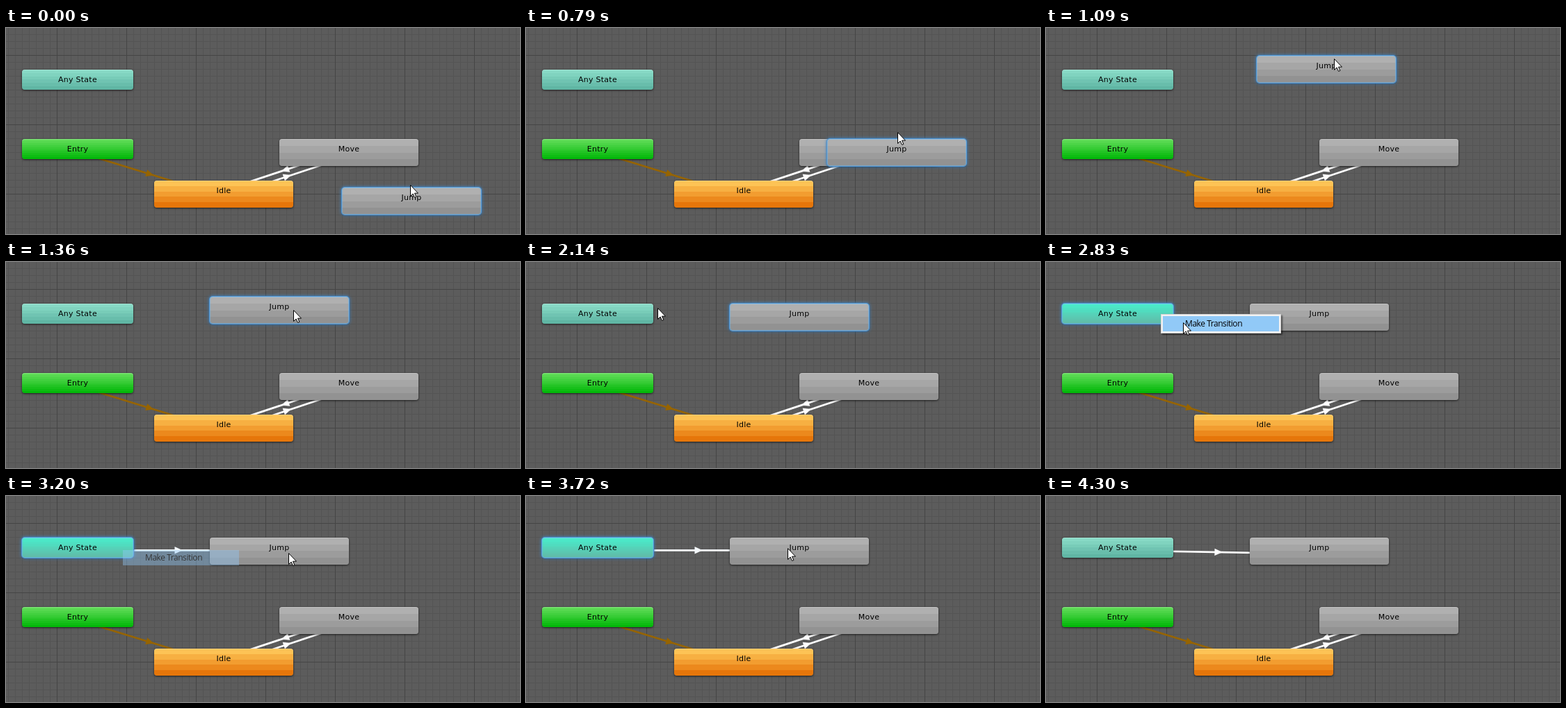
These frames come from a looping animation (739x297 px, 5.71 s). An HTML page:

```html
<!DOCTYPE html>
<html lang="en">
<head>
<meta charset="utf-8">
<title>State graph</title>
<style>
html, body { margin: 0; width: 100%; height: 100%; overflow: hidden; }
body {
  position: relative;
  background:
    repeating-linear-gradient(90deg, #454545 0 1px, transparent 1px 100px) 73px 0 / 100px 100px,
    repeating-linear-gradient(#454545 0 1px, transparent 1px 100px) 0 39px / 100px 100px,
    repeating-linear-gradient(90deg, #545454 0 1px, transparent 1px 10px) 3px 0 / 10px 10px,
    repeating-linear-gradient(#545454 0 1px, transparent 1px 10px) 0 9px / 10px 10px,
    #5c5c5c;
}
svg, div { position: absolute; left: 0; top: 0; }
.node, .node i { border-radius: 4px; }
.node {
  font: 11px/30px "DejaVu Sans", sans-serif;
  letter-spacing: .25px;
  text-align: center;
  color: #000;
  box-shadow: 0 1px 3px rgba(0, 0, 0, .65);
}
.node i { position: absolute; inset: 0; box-shadow: inset 0 1px rgba(255, 255, 255, .22); }
.node i.glow {
  opacity: 0;
  box-shadow: inset 0 0 1px 1px rgba(110, 185, 240, .5), 0 0 0 1px #4f94d2, 0 0 4px 1px #3f8ad0;
}
.node span { position: relative; }
#menu {
  left: 165px; top: 75px; width: 173px; height: 28px;
  background: #f2f2f2;
  box-shadow: inset 0 0 0 1px #d4d4d4, 2px 2px 2px rgba(0, 0, 0, .5);
}
.item {
  left: 168px; top: 78px; width: 167px; height: 22px;
  font: 12px/22px "Open Sans", sans-serif;
  letter-spacing: -.45px;
  text-indent: 32px;
  white-space: nowrap;
  color: #000;
}
#pick { background: #91c9f7; }
</style>
</head>
<body>
<svg id="links" width="739" height="297"></svg>
<div id="menu"></div>
<div id="label" class="item">Make Transition</div>
<div id="pick" class="item">Make Transition</div>
<svg id="cursor" width="12" height="19">
  <path d="M.5 .6V16.5L4.1 13L6.6 18.4L8.9 17.5L6.5 12.2H11.5Z" fill="#fff" stroke="#000"/>
</svg>
<script>
const LOOP = 5710, TICK = 134, LEAD = 30;
const $ = id => document.getElementById(id);
const clamp = (v, lo, hi) => Math.min(hi, Math.max(lo, v));
const show = (el, opacity) => { el.style.opacity = Number(opacity); };
const place = (el, [x, y]) => { el.style.transform = `translate(${x}px, ${y}px)`; };

// Shades from one colour down to another in n flat bands.
function bands(top, bottom, n) {
  const stops = Array.from({ length: n }, (_, i) => {
    const rgb = top.map((c, j) => Math.round(c + (bottom[j] - c) * i / (n - 1)));
    return `rgb(${rgb}) ${100 * i / n}% ${100 * (i + 1) / n}%`;
  });
  return `linear-gradient(${stops})`;
}

const gray = bands([176, 176, 176], [146, 146, 146], 4);
const orange = bands([253, 195, 85], [230, 118, 10], 5);
const green = bands([96, 220, 88], [4, 184, 10], 10);
const teal = bands([136, 218, 198], [96, 182, 164], 6);
const aqua = bands([72, 236, 203], [97, 188, 168], 10);

function node(text, x, y, w, h, ...fills) {
  const el = document.createElement('div');
  el.className = 'node';
  el.style.cssText = `left:${x}px;top:${y}px;width:${w}px;height:${h}px`;
  const layers = [...fills, 'none'].map(fill => {
    const i = document.createElement('i');
    i.style.background = fill;
    el.append(i);
    return i;
  });
  const glow = layers[layers.length - 1];
  glow.className = 'glow';
  const label = document.createElement('span');
  label.textContent = text;
  el.append(label);
  document.body.insertBefore(el, $('menu'));
  return { el, layers, glow };
}

// A line between two centres, shifted sideways, with an arrowhead halfway.
function link(x1, y1, x2, y2, shift, color) {
  const half = Math.hypot(x2 - x1, y2 - y1) / 2;
  const angle = Math.atan2(y2 - y1, x2 - x1) * 180 / Math.PI;
  const g = document.createElementNS('http://www.w3.org/2000/svg', 'g');
  g.setAttribute('transform', `translate(${x1} ${y1}) rotate(${angle}) translate(${half} ${shift})`);
  g.innerHTML = `<path d="M${-half} 0H${half}" stroke="${color}" stroke-width="2.7"/>
    <path d="M-5.5 -5.2L5.8 0L-5.5 5.2Z" fill="${color}"/>`;
  $('links').append(g);
  return g;
}

link(103, 175, 313, 240, 3.4, '#966400');
link(313, 239.3, 493, 179.3, 4.9, '#fff');
link(493, 179.3, 313, 239.3, 4.9, '#fff');
const draft = link(103, 74.8, 393, 74.8, 3.5, '#f4f8fb');
const done = link(103, 75, 393, 80, 3.5, '#fff');

const any = node('Any State', 23, 60, 160, 29, teal, aqua);
node('Entry', 23, 160, 160, 29, green);
node('Idle', 213, 220, 200, 39, orange);
node('Move', 393, 160, 200, 39, gray);
const jump = node('Jump', 0, 0, 200, 39, gray);

// Mouse stops as [tick, x, y]; each stretch slows down towards its end.
const STOPS = [
  [0, 581, 226], [3, 604, 249], [5, 604, 249], [6, 534, 150], [7, 449, 78], [8, 414, 44],
  [10, 413, 69], [11, 413, 78], [14, 225, 64], [17, 183, 66], [19, 165, 75], [21, 197, 87],
  [22, 197, 87], [24, 406, 82], [26, 376, 75], [30, 376, 75], [31, 571, 166],
];
function mouse(k) {
  const i = STOPS.findIndex(s => s[0] >= k);
  if (i < 0) return STOPS[STOPS.length - 1].slice(1);
  const [t1, ...to] = STOPS[i];
  if (i === 0) return to;
  const [t0, ...from] = STOPS[i - 1];
  const e = Math.sin((k - t0) / (t1 - t0) * Math.PI / 2);
  return to.map((v, j) => Math.round(from[j] + (v - from[j]) * e));
}

// The dragged node trails the mouse by half a tick and snaps to the grid.
function dragged(k) {
  const [x, y] = mouse(clamp(k, 3.5, 11) - .5);
  const snap = v => Math.round(v / 10) * 10;
  return [snap(x - 124) + 3, snap(y - 19)];
}

function render(t) {
  const k = Math.floor((t + LEAD) / TICK);
  const picked = k >= 17 && k < 28;

  place($('cursor'), mouse(k));
  show($('cursor'), k < 32);
  place(jump.el, dragged(k));
  show(jump.glow, k < 17);
  show(any.glow, picked);
  show(any.layers[1], picked);

  show($('menu'), k >= 20 && k < 23);
  show($('label'), k === 20);
  show($('pick'), k < 21 ? 0 : clamp((26 - k) / 3.1, 0, 1) ** 2);
  show(draft, k >= 24 && k < 28);
  show(done, k >= 28);
}

const start = performance.now();
function loop() {
  render((performance.now() - start) % LOOP);
  requestAnimationFrame(loop);
}
loop();
</script>
</body>
</html>
```
